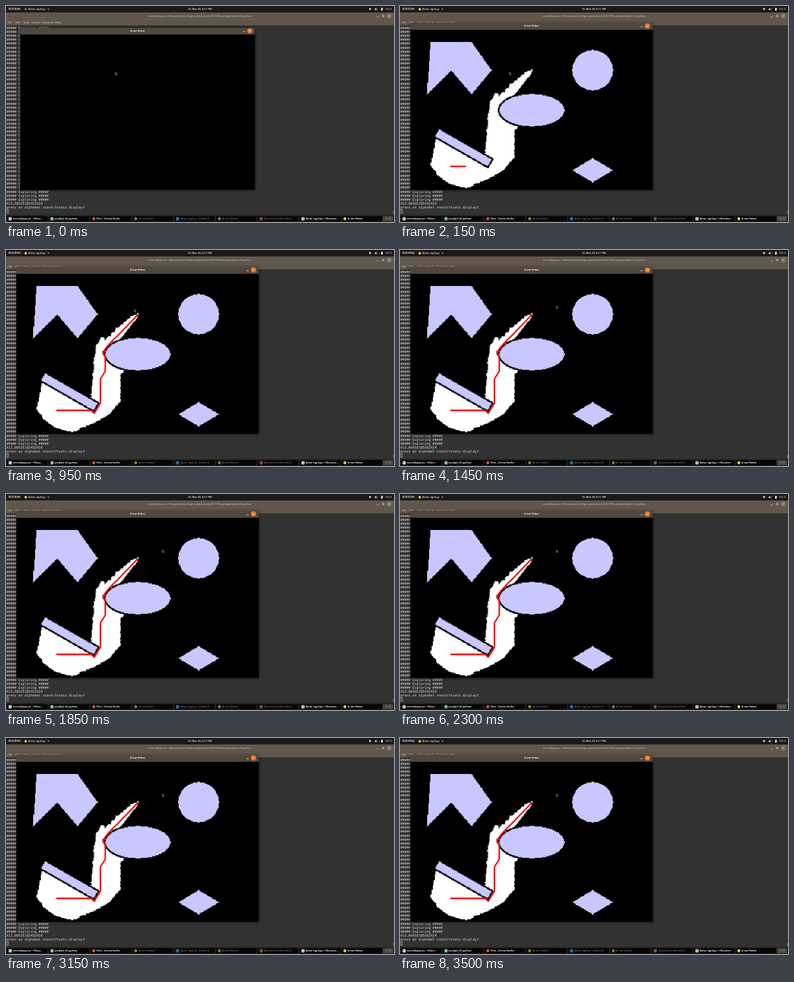
An HTML page with a canvas that plays this animation: 600x336 px, repeating every 3.55 s.

```html
<!DOCTYPE html>
<html lang="en">
<head>
<meta charset="utf-8">
<title>A star Robot</title>
<style>
html, body { margin: 0; width: 100%; height: 100%; overflow: hidden; background: #323232; }
svg, canvas, #win { position: absolute; left: 0; top: 0; }
svg text { font-family: "Open Sans", "Noto Sans", sans-serif; white-space: pre; }
svg .mono { font-family: "DejaVu Sans Mono", "Noto Sans Mono", monospace; }
#win {
  left: 16px; top: 26px; width: 375px; height: 260px; background: #000;
  transform-origin: 50% 100%; box-shadow: 0 1px 4px rgba(0, 0, 0, .5);
}
#map { top: 11px; width: 375px; height: 249px; }
</style>
</head>
<body>
<svg id="desk" width="600" height="336"></svg>
<div id="win">
  <canvas id="map" width="1500" height="1000"></canvas>
  <svg width="375" height="260" viewBox="16 26 375 260">
    <rect x="16" y="26" width="375" height="11" fill="#50473f"/>
    <text x="203.5" y="32.3" font-size="3.75" font-weight="700" text-anchor="middle" fill="#f3f0ec">A star Robot</text>
    <path d="M372 32.2h3.2" stroke="#e8e4e0" stroke-width=".8"/>
    <circle cx="382.6" cy="31.1" r="4" fill="#e9792c"/>
    <path d="M381.5 30l2.2 2.2m0-2.2l-2.2 2.2" stroke="#fbe3d0" stroke-width=".6"/>
    <path id="route" fill="none" stroke="#f50606" stroke-width="2.3" stroke-linejoin="round"
      d="M78 249.5H132L136.5 254L146 238.5V200.5L153.5 188.5V165.5L150 161.5V158L153 157.5L150.5 158.5L157 149.5L167 138.5L172 134L204 100.5"/>
  </svg>
</div>
<svg width="600" height="336">
  <path id="mouse" d="M0 0V4.2L1 3.4L1.8 5L2.5 4.7L1.8 3.1H3Z" fill="#111" stroke="#ddd" stroke-width=".45"/>
</svg>
<script>
const LOOP = 3550;
const $ = id => document.getElementById(id);
const desk = $('desk');

function add(tag, attrs, text = '') {
  const el = document.createElementNS('http://www.w3.org/2000/svg', tag);
  for (const key in attrs) el.setAttribute(key, attrs[key]);
  el.textContent = text;
  desk.append(el);
  return el;
}
const box = (x, y, width, height, fill, more) => add('rect', { x, y, width, height, fill, ...more });
const line = (d, stroke, w = .7, fill = 'none') => add('path', { d, stroke, fill, 'stroke-width': w });
const label = (x, y, text, size, fill, more) => add('text', { x, y, 'font-size': size, fill, ...more }, text);
const bold = { 'font-weight': 600 };
const middle = { 'font-weight': 600, 'text-anchor': 'middle' };

function drawTerminal() {
  box(0, 0, 600, 336, '#323232');
  box(0, 10, 600, 20, '#60564c');
  label(300, 16.7, 'tarvin@pop-os: ~/Documents/college_projects/sem2/671/Planning/proj3p2_v0_python', 3.85, '#b9b2aa', middle);
  box(588.6, 11.6, 8, 8, '#7d746b', { rx: 4 });
  line('M573 17h3M591.5 14.5l2.2 2.2m0-2.2l-2.2 2.2', '#dcd7d1');
  line('M582 14.2h2.6v2.6h-2.6z', '#dcd7d1');
  const menu = { File: 2.5, Edit: 14.5, View: 27, Search: 39.5, Terminal: 56, Help: 76 };
  for (const name in menu) label(menu[name], 27.2, name, 4.2, '#dcd7d1');

  const lines = Array(44).fill('##### Exploring #####');
  lines.push('412.00435185432434', 'press an alphabet xnasncfnsato displayf');
  lines.forEach((s, i) => label(.7, 35.5 + i * 6.22, s, 5.16, '#d6d6d6', { class: 'mono' }));
  line('M1.2 316.6h2.7v5.8h-2.7z', '#d6d6d6', .6);
  box(598.6, 319, 1, 4, '#8c8c8c');
}

function drawPanel() {
  box(0, 0, 600, 10, '#1c1918');
  label(3.5, 6.3, 'Activities', 4.35, '#eceae8', bold);
  box(28.5, 3, 4, 4, '#6a6a6a', { rx: 2, id: 'app' });
  label(34.6, 6.3, 'Astar_rigid.py', 4, '#eceae8', bold);
  line('M64.3 4.2h2.6l-1.3 1.8z', 'none', 0, '#ddd');
  label(300, 6.3, 'Fri Mar 20, 8:11 PM', 4, '#f2f0ee', middle);
  line('M561 4.2Q563 2.4 565 4.2L563 6.8z', 'none', 0, '#ddd');
  line('M570 4.2h1l1.5-1.5v4.6l-1.5-1.5h-1z', 'none', 0, '#ddd');
  line('M573.6 3.6q1.2 1.4 0 2.8', '#ddd', .6);
  box(580, 2.8, 2.6, 4.4, '#ddd', { rx: .4 });
  label(586, 6.3, '100 %', 3.9, '#eceae8');
}

function drawTasks() {
  const tasks = [
    ['tarvin@pop-os: ~/Docu...', '#dcdcdc'],
    ['proj3p2_v0_python', '#7fc4a0'],
    ['Files - Corvia Surfer', '#d9513f', 'round'],
    ['[A star Robot]', '#7d8038', 'round dim'],
    ['[Astar_rigid.py - Quillon D...', '#2b6f9e', 'dim'],
    ['[A star Robot]', '#7d8038', 'round dim'],
    ['[SimpleScreenRecorder]', '#8a4a48', 'dim'],
    ['Astar_rigid.py (~/Docume...', '#e4dcd6'],
    ['A star Robot', '#d5cf45', 'round']
  ];
  box(0, 325.5, 600, 10.5, '#1c1a19');
  tasks.forEach(([name, color, kind = ''], i) => {
    const x = 1 + i * 64.7;
    const dim = kind.includes('dim');
    box(x, 326.6, 63.4, 8.6, '#060606', { stroke: '#383532', 'stroke-width': .5, rx: .8 });
    box(x + 3, 328.6, 4.8, 4.8, color, { rx: kind.includes('round') ? 2.4 : .5 });
    label(x + 9.6, 332.3, name, 3.8, dim ? '#8f8b87' : '#f2f0ed', { 'font-weight': dim ? 400 : 700 });
  });
  line('M4.8 329.8l1.3 1.2-1.3 1.2', '#222', .6);
  line('M457.8 330h2.6m-2.6 1.6h2.6', '#c33b32', .6);
  box(583, 326.8, 15.5, 8.4, '#4a4642', { rx: .8 });
  label(590.8, 332.3, '1 / 3', 3.9, '#e2dfdc', { 'text-anchor': 'middle' });
}

// The search map is 300 by 200 cells, each a little over a pixel on stage.
function drawMap() {
  const ctx = $('map').getContext('2d');
  const blocks = new Path2D(
    'M46.9 55.5H110L141.1 99.3L110 136.8L78.5 99.5L40.9 136.8Z' +
    'M53.6 202L59.8 191.2L141 237.9L134.7 248.7Z' +
    'M266 254.9L297.3 236.1L328.6 254.9L297.3 273.7Z');
  for (const [x, y, rx, ry] of [[297.25, 99.25, 31.3, 31.2], [203.5, 161.5, 50.1, 25]]) {
    blocks.moveTo(x + rx, y);
    blocks.ellipse(x, y, rx, ry, 0, 0, 7);
  }
  const seen = new Path2D('M204 98L196 101L189 106L182 112L175 118L169 121L168 127L163 128L161 133' +
    'L157 134L153 140L151 134L146 136L144 142L139 147L137 160L135 175L134 190L132 212L130 234' +
    'L137 243L60 199L54 209L50 231L46 247L61 266L74 275L92 281L103 283L118 276L140 266' +
    'L158 256L166 246L176 235V196L181 187L154 163L163 148L176 138L185 127L191 119L198 110L204 101Z');
  const noise = n => { const v = Math.sin(n * 12.9898) * 43758.5; return (v - Math.floor(v) - .5) * 1.6; };
  ctx.lineWidth = 5.2;
  for (let j = 0; j < 200; j++) {
    for (let i = 0; i < 300; i++) {
      const x = 16 + i * 1.25, y = 37 + j * 1.245;
      if (ctx.isPointInPath(blocks, x, y)) ctx.fillStyle = '#c8c8ff';
      else if (x < 206 && !ctx.isPointInStroke(blocks, x, y) &&
        ctx.isPointInPath(seen, x + noise(j >> 1), y + noise(300 + (i >> 1)))) ctx.fillStyle = '#fff';
      else continue;
      ctx.fillRect(i * 5, j * 5, 5, 5);
    }
  }
}

// Each step is [ms, value]; values hold before the first and after the last.
function play(el, prop, steps) {
  const frames = [[0, steps[0][1]], ...steps, [LOOP, steps[steps.length - 1][1]]]
    .map(([ms, value]) => ({ offset: ms / LOOP, [prop]: value }));
  el.animate(frames, { duration: LOOP, iterations: Infinity });
}

drawTerminal();
drawPanel();
drawTasks();
drawMap();

const route = $('route');
const size = route.getTotalLength();
route.style.strokeDasharray = `${size} ${size + 9}`;
play($('win'), 'transform', [[0, 'scale(.968, .97)'], [90, 'scale(1, 1)']]);
play($('app'), 'fill', [[45, '#6a6a6a'], [45, '#d5cf45']]);
play($('map'), 'opacity', [[90, 0], [90, 1]]);
play(route, 'opacity', [[90, 0], [90, 1]]);
play(route, 'strokeDashoffset', [[80, size], [150, size - 23.5], [830, 0]]);
const at = (x, y) => `translate(${x}px, ${y}px)`;
play($('mouse'), 'transform', [
  [820, at(169, 102.5)], [880, at(179, 98)], [950, at(198, 92)], [1020, at(222, 87)], [1120, at(241.5, 86.5)]
]);
</script>
</body>
</html>
```
